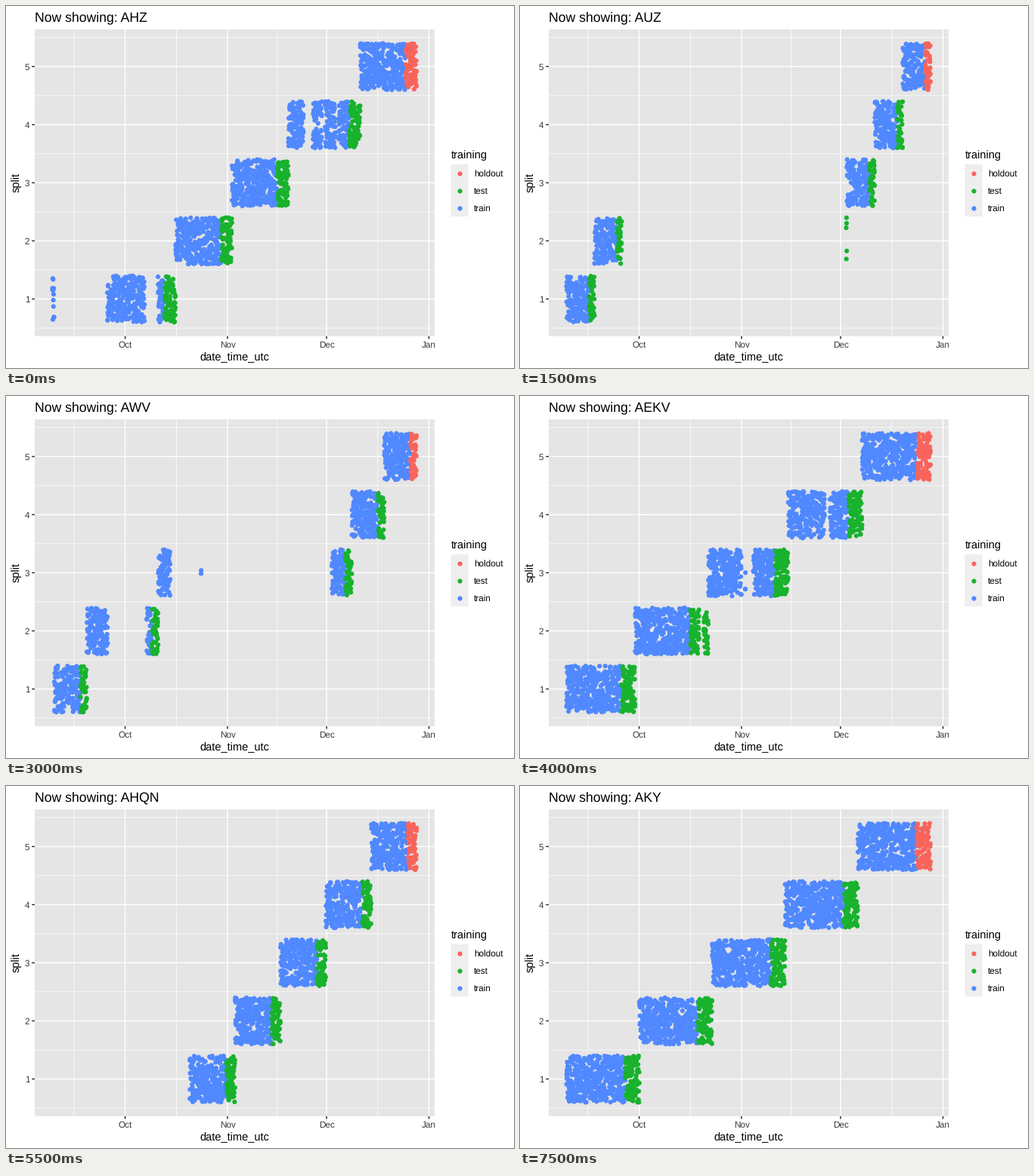
Write a matplotlib script that moves like this. It is 672 px wide and 480 px high and loops after 8 s.

```python
import numpy as np
import matplotlib.pyplot as plt
from matplotlib.animation import FuncAnimation
from matplotlib.patches import Rectangle

plt.rcParams["font.family"] = "Liberation Sans"
plt.rcParams["text.hinting"] = "none"

W, H, DPI = 672, 480, 96
LEFT, RIGHT, TOP, BOTTOM = 38, 566.8, 31, 437.8
ROW1, ROW_STEP = 388.5, 77.05
OCT, DAY = 157.6, 4.368  # x of October 1st, pixels per day
END = 543.2
SPLITS, TRAIN_SHARE = 5, 0.805

BLUE, GREEN, RED = "#5088ff", "#18b22d", "#f8645c"
PANEL, KEY, TICK, TICK_TEXT = "#e5e5e5", "#eeeeee", "#242424", "#3c3c3c"
DOT = (6.2 * 72 / DPI) ** 2
KEY_X, KEY_Y, KEY_SIZE = 588.5, 210, 23.04

TITLES = ["AHZ", "AUZ", "AUKP", "AWV", "AEKV", "AHQN", "AEY", "AKY"]

# First record of each series, then the gaps without records
SERIES = [
    (61.5, (63.6, 134), (183.3, 201), (393.6, 406), (418, 422), (436, 440)),
    (61.5,),
    (61.5, (134.5, 431.4)),
    (64, (134.5, 186), (217.3, 257.9), (258.3, 431)),
    (61.5, (237, 243), (293, 297.9), (298.3, 308.5), (403, 410)),
    (134,),
    (243,),
    (134, (250, 254.5)),
    (61.5,),
]


def cloud(seed, start, *gaps):
    """Hourly records cut into equal splits, each train first, then test."""
    x = np.arange(start, END, DAY / 24)
    for a, b in gaps:
        x = x[(x <= a) | (x >= b)]
    place = np.arange(x.size) * SPLITS / x.size
    row = place.astype(int)
    jitter = np.random.default_rng(seed).uniform(-0.4, 0.4, x.size)
    y = ROW1 - ROW_STEP * (row + jitter)
    later = np.where(row == SPLITS - 1, RED, GREEN)
    return np.column_stack([x, y]), np.where(place % 1 < TRAIN_SHARE, BLUE, later)


fig = plt.figure(figsize=(W / DPI, H / DPI), dpi=DPI, facecolor="white")
ax = fig.add_axes([0, 0, 1, 1])
ax.set_xlim(0, W)
ax.set_ylim(H, 0)
ax.axis("off")


def box(x, y, w, h, color):
    ax.add_patch(Rectangle((x, y), w, h, fc=color, ec="none", zorder=0,
                           snap=False))


def line(xs, ys, color="white", px=1.42):
    ax.plot(xs, ys, color=color, lw=px * 72 / DPI, zorder=1, snap=False,
            solid_capstyle="butt")


def label(x, y, text, size, color="black", va="baseline", **kw):
    return ax.text(x, y, text, fontsize=size, color=color, va=va, **kw)


def dot_set(x, y, color, zorder):
    return ax.scatter(x, y, s=DOT, c=color, linewidths=0, zorder=zorder,
                      snap=False)


box(LEFT, TOP, RIGHT - LEFT, BOTTOM - TOP, PANEL)

# Minor grid lines lie half way between the major ones
for day in (-15.5, 15.5, 46, 76.5):
    x = OCT + DAY * day
    line([x, x], [TOP, BOTTOM], px=0.71)
for k in range(SPLITS + 1):
    y = ROW1 - ROW_STEP * (k - 0.5)
    line([LEFT, RIGHT], [y, y], px=0.71)

for day, month in ((0, "Oct"), (31, "Nov"), (61, "Dec"), (92, "Jan")):
    x = OCT + DAY * day
    line([x, x], [TOP, BOTTOM])
    line([x, x], [BOTTOM, BOTTOM + 3.67], TICK)
    label(x, 453.2, month, 8.8, TICK_TEXT, ha="center")
for k in range(SPLITS):
    y = ROW1 - ROW_STEP * k
    line([LEFT, RIGHT], [y, y])
    line([LEFT - 3.67, LEFT], [y, y], TICK)
    label(31.4, y + 4.2, k + 1, 8.8, TICK_TEXT, ha="right")

label((LEFT + RIGHT) / 2, 470, "date_time_utc", 11, ha="center")
label(14, (TOP + BOTTOM) / 2, "split", 11, va="center", ha="center",
      rotation=90)

label(KEY_X, 202, "training", 11)
box(KEY_X, KEY_Y, KEY_SIZE, 3 * KEY_SIZE, KEY)
for k, (name, color) in enumerate(
        (("holdout", RED), ("test", GREEN), ("train", BLUE))):
    y = KEY_Y + KEY_SIZE * (k + 0.5)
    dot_set([KEY_X + KEY_SIZE / 2], [y], color, 2)
    label(618.7, y + 4.5, name, 8.8)

title = label(LEFT - 0.5, 20, "", 13.2)
clouds = [cloud(40 + i, *spec) for i, spec in enumerate(SERIES)]
dots = dot_set([], [], None, 3)


def update(step):
    # The data run half a state ahead of the title
    points, colors = clouds[(step + 1) // 2]
    dots.set_offsets(points)
    dots.set_facecolors(colors)
    title.set_text("Now showing: " + TITLES[step // 2])
    return dots, title


anim = FuncAnimation(fig, update, frames=16, interval=500, repeat=True,
                     repeat_delay=0, init_func=lambda: update(0))
plt.show()
```
